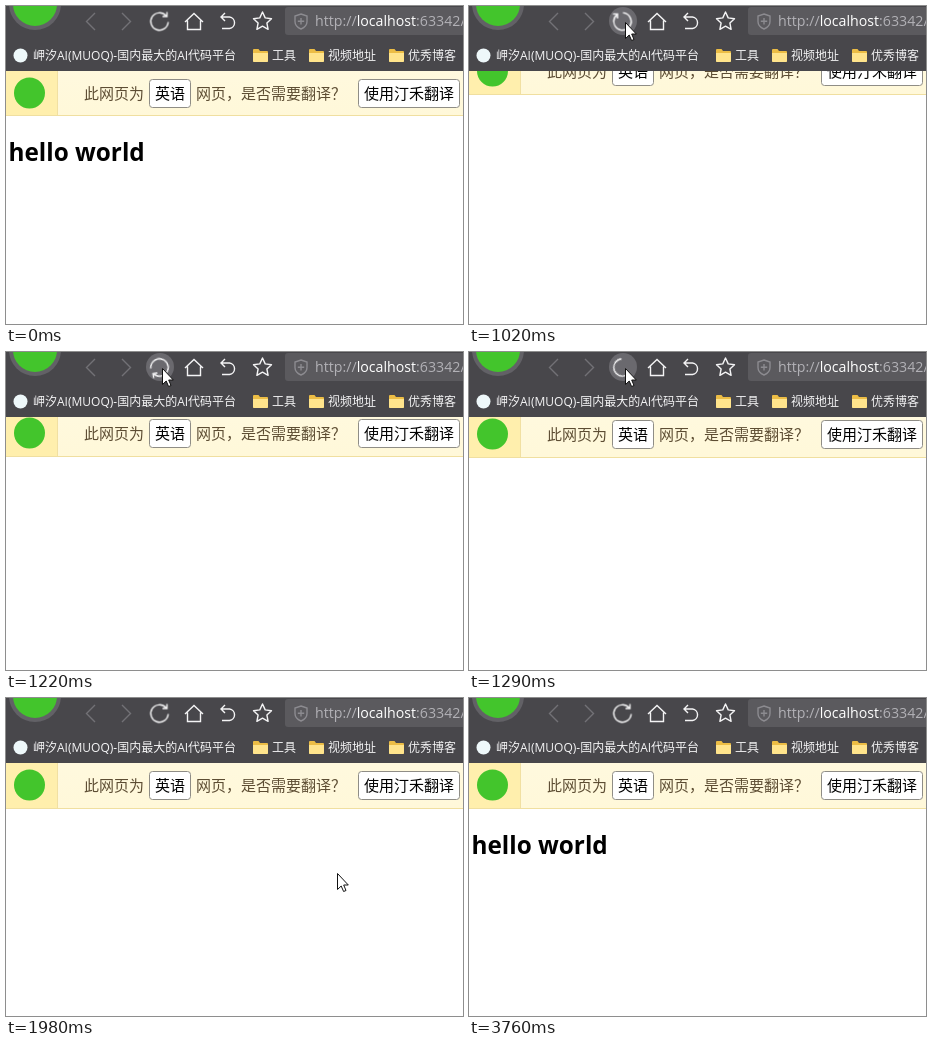
An HTML page that plays this animation: 457 by 318 pixels, repeating every 4.56 s.

```html
<!DOCTYPE html>
<html lang="zh-CN">
<head>
<meta charset="utf-8">
<title>hello world</title>
<style>
  html, body { margin: 0; width: 100%; height: 100%; overflow: hidden; background: #fff; }
  svg { display: block; width: 457px; height: 318px; }
  text { font-family: "Open Sans", "Noto Sans CJK SC", "Noto Sans CJK", sans-serif; white-space: pre; }
  .bookmarks text { font-size: 12px; fill: #f4f4f5; }
  .bar text { font: 15px "Noto Sans CJK SC", "Noto Sans CJK", sans-serif; fill: #5d4d33; }
  .bar .button text { fill: #000; }
  .button rect { fill: #fff; stroke: #8f8d86; }
  .heading { font-size: 24.3px; font-weight: 700; }
  .icon { fill: none; stroke: #f4f4f5; stroke-width: 1.4; }
  .dim { stroke: #727176; }

  .heading, .bar, .backdrop, .spin, .reload-hover, .link-hover, .cursor {
    animation: 4560ms step-end infinite;
  }
  .heading { animation-name: heading; }
  .bar { animation-name: slide; }
  .backdrop { animation-name: settle; }
  .spin { animation-name: spin; }
  .reload-hover { animation-name: reload-hover; }
  .link-hover { animation-name: link-hover; }
  .cursor { animation-name: cursor; }

  @keyframes heading {
    0% { opacity: 1; transform: none; }
    22.36% { opacity: 0; }
    69.51%, 100% { opacity: 1; transform: translateY(1px); }
  }
  @keyframes slide {
    0% { transform: none; }
    22.36% { transform: translateY(-22px); }
    23.9% { transform: translateY(-13px); }
    25.21% { transform: translateY(-8px); }
    26.75% { transform: translateY(-6px); }
    28.28% { transform: translateY(-5px); }
    29.82% { transform: translateY(-3px); }
    31.35% { transform: translateY(-1px); }
    32.89%, 100% { transform: none; }
  }
  @keyframes settle {
    0% { transform: none; }
    22.36%, 100% { transform: translateY(1px); }
  }
  @keyframes spin {
    0% { transform: none; stroke-dasharray: none; }
    22.36% { transform: rotate(-90deg); }
    23.9% { transform: rotate(-25deg); }
    25.21% { transform: rotate(40deg); }
    26.75% { transform: rotate(170deg); }
    28.28% { transform: rotate(305deg); stroke-dasharray: 0 18 60; }
    29.82% { transform: rotate(75deg); stroke-dasharray: 0 18 60; }
    31.35% { transform: rotate(205deg); stroke-dasharray: 0 18 60; }
    32.89% { transform: rotate(335deg); }
    34.42%, 100% { transform: none; stroke-dasharray: none; }
  }
  @keyframes reload-hover {
    0% { opacity: 0; }
    16.44% { opacity: 1; }
    32.89%, 100% { opacity: 0; }
  }
  @keyframes link-hover {
    0% { opacity: 0; }
    13.37% { opacity: 1; }
    14.91%, 100% { opacity: 0; }
  }
  @keyframes cursor {
    0% { transform: translate(-40px, -40px); }
    4.38% { transform: translate(367px, 295px); }
    5.92% { transform: translate(337px, 256px); }
    7.45% { transform: translate(289px, 197px); }
    8.99% { transform: translate(241px, 138px); }
    10.3% { transform: translate(205px, 93px); }
    11.84% { transform: translate(182px, 64px); }
    13.37% { transform: translate(174px, 44px); }
    14.91% { transform: translate(163px, 26px); }
    16.44% { transform: translate(159px, 19px); }
    17.98% { transform: translate(157px, 16px); }
    34.42% { transform: translate(180px, 65px); }
    35.96% { transform: translate(220px, 100px); }
    37.5% { transform: translate(259px, 130px); }
    39.03% { transform: translate(292px, 152px); }
    40.35% { transform: translate(317px, 167px); }
    43.42% { transform: translate(332px, 175px); }
    70.83% { transform: translate(336px, 182px); }
    72.14% { transform: translate(343px, 193px); }
    73.68% { transform: translate(354px, 210px); }
    75.21% { transform: translate(366px, 228px); }
    76.53% { transform: translate(378px, 247px); }
    78.07% { transform: translate(390px, 267px); }
    79.38% { transform: translate(402px, 287px); }
    80.92% { transform: translate(413px, 306px); }
    82.45%, 100% { transform: translate(-40px, -40px); }
  }
</style>
</head>
<body>
<svg viewBox="0 0 457 318">
  <defs>
    <linearGradient id="cream" x2="0" y2="1">
      <stop offset=".5" stop-color="#fff9de"/>
      <stop offset="1" stop-color="#fff8d9"/>
    </linearGradient>
    <g id="folder">
      <path d="M0 1.5Q0 .5 1 .5H5.5L7 2.5H14Q15 2.5 15 3.5V13H0Z" fill="#ecbd45"/>
      <path d="M0 4.5H15V12.5Q15 13.5 14 13.5H1Q0 13.5 0 12.5Z" fill="#ffe48c"/>
    </g>
  </defs>

  <text class="heading" x="2.5" y="155">hello world</text>

  <g class="bar">
    <g class="backdrop">
      <rect y="20" width="457" height="90" fill="url(#cream)"/>
      <rect y="20" width="52" height="90" fill="#ffefad"/>
      <rect x="51" y="20" width="1" height="90" fill="#f1e0a2"/>
      <rect y="109" width="457" height="1" fill="#f0dfa0"/>
    </g>
    <circle cx="23.5" cy="87" r="15.5" fill="#43c52c"/>
    <text x="78" y="93">此网页为</text>
    <g class="button">
      <rect x="143.5" y="73.5" width="41" height="28" rx="3"/>
      <text x="149" y="93">英语</text>
    </g>
    <text x="190" y="93">网页，是否需要翻译？</text>
    <g class="button">
      <rect x="352.5" y="73.5" width="101" height="28" rx="3"/>
      <text x="358" y="93">使用汀禾翻译</text>
    </g>
  </g>

  <rect width="457" height="65" fill="#48474b"/>
  <circle cx="29" cy="-2" r="26" fill="#626166"/>
  <circle cx="29" cy="-2" r="22" fill="#43c52c"/>

  <circle class="reload-hover" cx="154" cy="15" r="14" fill="#6a696e"/>
  <g class="icon">
    <path class="dim" d="M89 7L80.5 15.5L89 24M116 7L124.5 15.5L116 24"/>
    <g transform="translate(153.500 15.500)">
      <path class="spin" d="M8.700 .5A8.700 8.700 0 1 1 6.500 -5.800M7.500 -9.500V-5H3"/>
    </g>
    <path d="M179 16L188 7.500L197 16M181.500 14.500V23.500H194.500V14.500"/>
    <path d="M219 7L215 11L219 15M215 11H223.500A5.800 5.800 0 0 1 223.500 22.500H216"/>
    <path stroke-linejoin="round" d="M256.500 6L259.200 11.900L265.500 12.700L260.900 17L262.100 23.300L256.500 20.200L250.900 23.300L252.100 17L247.500 12.700L253.800 11.900Z"/>
  </g>

  <rect x="279" y="1" width="190" height="28" rx="3" fill="#5b5a5e"/>
  <path class="icon" style="stroke:#8c8b90" d="M295 8L301 10V15.500Q301 20.500 295 23Q289 20.500 289 15.500V10ZM295 12V18.500M291.800 15.200H298.200"/>
  <text x="309" y="20" font-size="14.200" fill="#b2b1b6">http://<tspan fill="#fff">localhost</tspan>:63342/</text>

  <g class="bookmarks">
    <rect class="link-hover" x="1" y="39" width="239" height="21.500" rx="10" fill="#5d5c61"/>
    <circle cx="14.500" cy="49.500" r="7" fill="#eef8fa"/>
    <text x="27" y="54">岬汐AI(MUOQ)-国内最大的AI代码平台</text>
    <use href="#folder" x="247" y="42.500"/>
    <text x="266" y="54">工具</text>
    <use href="#folder" x="303" y="42.500"/>
    <text x="322" y="54">视频地址</text>
    <use href="#folder" x="383" y="42.500"/>
    <text x="402" y="54">优秀博客</text>
  </g>

  <path class="cursor" d="M-.5 .5V16.500L3.200 13L5.600 18.500L8 17.500L5.700 12H10.300Z" fill="#fff" stroke="#111"/>
</svg>
</body>
</html>
```
